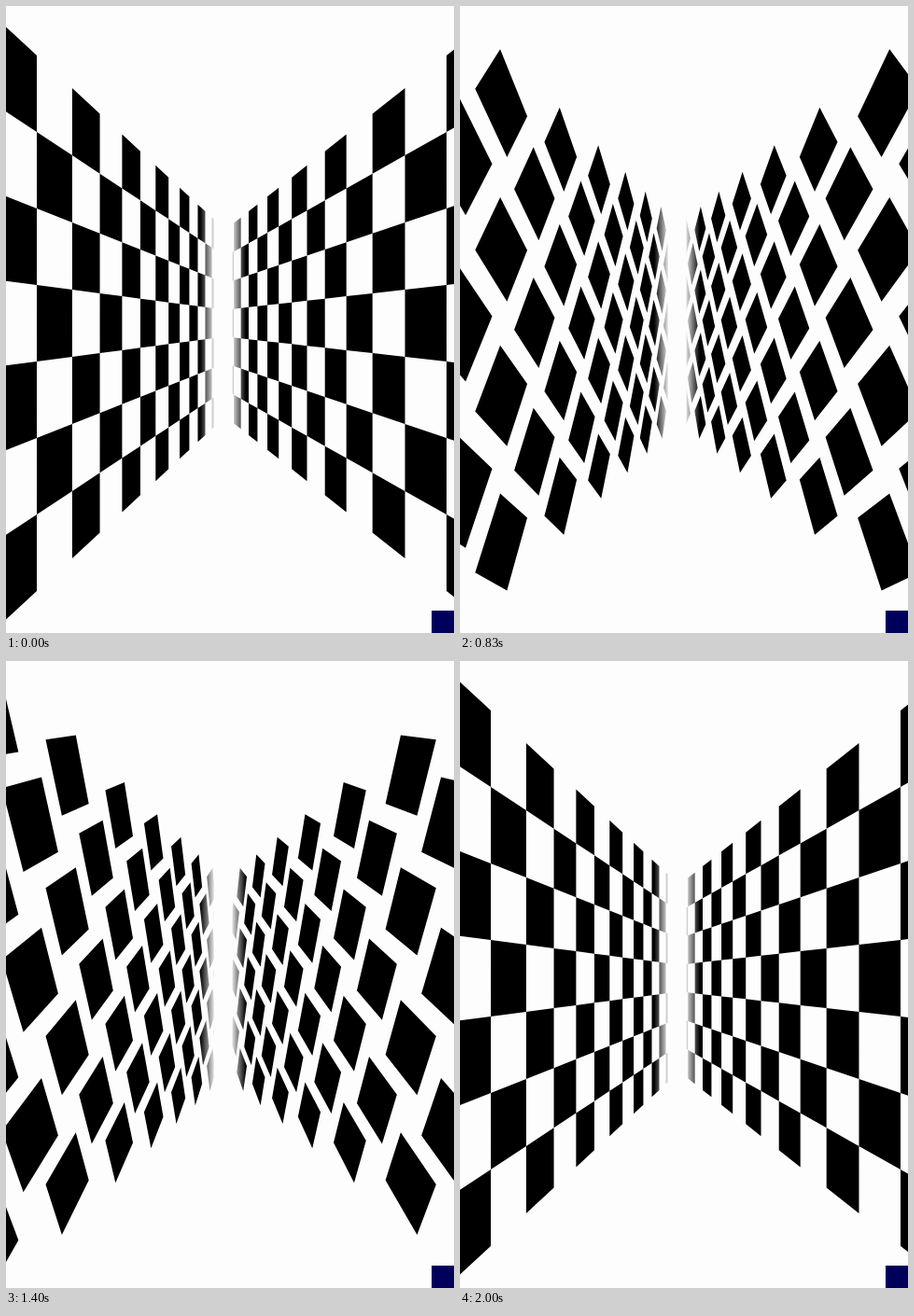
These frames come from a looping animation (480x672 px, 2030 ms). An HTML page with a canvas:

```html
<!DOCTYPE html>
<html lang="en">
<head>
<meta charset="utf-8">
<title>Turning checker walls</title>
<style>
html, body { margin: 0; width: 100%; height: 100%; overflow: hidden; background: #fefdfe; }
canvas { display: block; }
</style>
</head>
<body>
<canvas id="stage" width="480" height="672"></canvas>
<script>
const ctx = document.getElementById('stage').getContext('2d');
const LOOP = 2030, STEPS = 60, STEP_MS = 33.34;
const NEAR = 7.18;      // depth of column edge 0
const MID_Y = 340, ROW = 588.8;
const walls = [
  { x: 343.1, k: -2226.6 },
  { x: 107.8, k: 2615 }
];

// Ink fades out toward the far ends of both walls
const ink = ctx.createLinearGradient(0, 0, 480, 0);
for (const [x, alpha] of [
  [0, 1], [208, 1], [222, 0.15], [223.5, 0],
  [242, 0], [243.5, 0.18], [257, 1], [480, 1]
]) ink.addColorStop(x / 480, `rgba(0,0,0,${alpha})`);

// Unit square on a wall, centred at depth d and row v, projected to the stage
function tile(wall, d, v, turn) {
  for (let i = 0; i < 4; i++) {
    const a = turn + (i - 1.5) * Math.PI / 2;
    const depth = d + Math.cos(a) * Math.SQRT1_2;
    const row = v + Math.sin(a) * Math.SQRT1_2;
    const x = wall.x + wall.k / depth, y = MID_Y + ROW * row / depth;
    if (i) ctx.lineTo(x, y); else ctx.moveTo(x, y);
  }
  ctx.closePath();
}

function draw(p) {
  ctx.fillStyle = '#fefdfe';
  ctx.fillRect(0, 0, 480, 672);
  ctx.fillStyle = ink;
  walls.forEach((wall, side) => {
    ctx.save();
    ctx.beginPath();
    ctx.rect(side ? 233 : 0, 0, side ? 247 : 233, 672);
    ctx.clip();
    ctx.beginPath();
    for (let col = -4; col < 14; col++) {
      const last = col % 2 ? 3 : 2;
      for (let v = -last; v <= last; v += 2)
        tile(wall, NEAR + col + 0.5 + 2 * p, v, p * Math.PI / 2);
    }
    ctx.fill();
    ctx.restore();
  });
  ctx.fillStyle = '#00005a';
  ctx.fillRect(456, 648, 24, 24);
}

function tick() {
  const t = performance.now() % LOOP;
  draw(Math.min(STEPS, Math.floor((t + 4) / STEP_MS)) / STEPS);
  requestAnimationFrame(tick);
}
tick();
</script>
</body>
</html>
```
